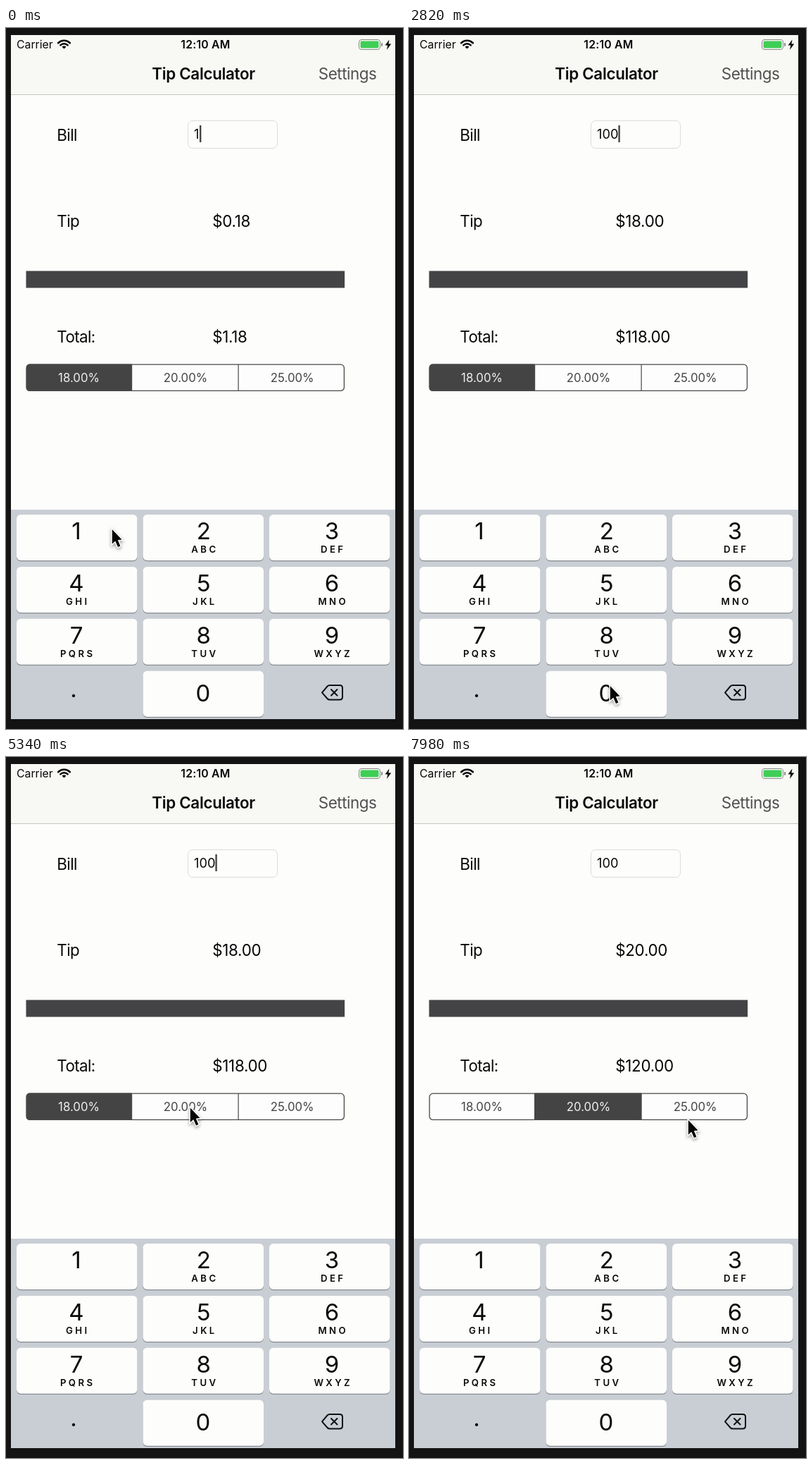
Animation, 564 px wide and 994 px high, one loop 8000 ms. Source, as an HTML page with a canvas:

```html
<!DOCTYPE html>
<html lang="en">
<head>
<meta charset="utf-8">
<title>Tip calculator</title>
<style>
  html, body { margin: 0; width: 100%; height: 100%; overflow: hidden; background: #131313; }
  canvas { display: block; width: 564px; height: 994px; }
</style>
</head>
<body>
<canvas id="stage" width="564" height="994"></canvas>
<script>
const ctx = document.getElementById('stage').getContext('2d');
const LOOP = 8000;
const FONT = 'Inter, "Open Sans", sans-serif';
const TINT = 68, PAPER = 253;
const WHITE = '#fdfdfb', INK = '#080808';

// Pointer stops: time, x, y
const PATH = [
  [0, 150, 709], [400, 150, 709], [1200, 285, 931], [3700, 285, 931],
  [4500, 257.5, 621], [5300, 261, 495.5], [6400, 261, 495.5],
  [6900, 288, 499], [7200, 288, 499], [7920, 396, 513], [8000, 396, 513]
];
const PRESSES = [[1440, 1660], [1850, 1980]];
const SEG_DOWN = 5920, SEG_UP = 6095, SEG_FADE = 250;

const KEYS = [
  ['1', ''], ['2', 'ABC'], ['3', 'DEF'],
  ['4', 'GHI'], ['5', 'JKL'], ['6', 'MNO'],
  ['7', 'PQRS'], ['8', 'TUV'], ['9', 'WXYZ']
];
const KEY_X = [15, 194.5, 374], LABEL_X = [100, 280.7, 463];
const ROW_Y = 690, ROW_STEP = 73.9;

const clamp = v => Math.max(0, Math.min(1, v));
const mix = (a, b, k) => a + (b - a) * k;
const gray = v => { v = Math.round(v); return `rgb(${v},${v},${v})`; };

function rect(x, y, w, h, color) {
  ctx.fillStyle = color;
  ctx.fillRect(x, y, w, h);
}

function round(x, y, w, h, r, fill, stroke, width = 1) {
  ctx.beginPath();
  ctx.roundRect(x, y, w, h, r);
  if (fill) { ctx.fillStyle = fill; ctx.fill(); }
  if (stroke) { ctx.strokeStyle = stroke; ctx.lineWidth = width; ctx.stroke(); }
}

function poly(points, fill) {
  ctx.beginPath();
  points.forEach(([x, y]) => ctx.lineTo(x, y));
  ctx.closePath();
  if (fill) { ctx.fillStyle = fill; ctx.fill(); }
}

function text(str, x, y, size, { weight = 400, align = 'left', color = INK, track = 0 } = {}) {
  ctx.font = `${weight} ${size}px ${FONT}`;
  ctx.letterSpacing = track + 'px';
  ctx.textAlign = align;
  ctx.fillStyle = color;
  ctx.fillText(str, align === 'center' ? x + track / 2 : x, y);
}

function pointerAt(t) {
  let i = 0;
  while (i < PATH.length - 2 && t >= PATH[i + 1][0]) i++;
  const [t0, x0, y0] = PATH[i], [t1, x1, y1] = PATH[i + 1];
  const k = clamp((t - t0) / (t1 - t0)), e = k * k * (3 - 2 * k);
  return [mix(x0, x1, e), mix(y0, y1, e)];
}

// Typing keeps the caret solid; otherwise it blinks with short fades.
function caretAlpha(t) {
  const period = 1050;
  if (t >= 1660 && t < 2260) return 1;
  const start = t < 1660 ? 1010 : 6980;
  const p = (((t - start + 40) % period) + period) % period - 40;
  return p < 300 ? clamp((p + 40) / 80) : clamp((660 - p) / 80);
}

function drawStatus() {
  text('Carrier', 15, 29.3, 15.8);
  text('12:10 AM', 283.3, 29.3, 15.8, { weight: 600, align: 'center', track: 0.2 });

  const cx = 82.5, cy = 29.6, a = -Math.PI * 0.75, b = -Math.PI * 0.25;
  ctx.beginPath();
  ctx.moveTo(cx, cy);
  ctx.arc(cx, cy, 4.2, a, b);
  ctx.fillStyle = INK;
  ctx.fill();
  ctx.strokeStyle = INK;
  ctx.lineWidth = 2.6;
  for (const r of [7.3, 11.8]) {
    ctx.beginPath();
    ctx.arc(cx, cy, r, a, b);
    ctx.stroke();
  }

  round(501.5, 16.5, 30, 14, 3.5, null, '#8a8a8a');
  round(503.5, 18.5, 26, 10, 2, '#3fce56');
  round(533, 21, 2, 5, 1, '#8a8a8a');
  poly([[544.5, 16.5], [538.5, 24.6], [542.2, 24.6], [541, 31], [547.2, 22.4], [543.4, 22.4]], INK);
}

function drawForm(t) {
  const bill = t < PRESSES[0][1] ? '1' : t < PRESSES[1][1] ? '10' : '100';
  const rate = t < SEG_UP ? 0.18 : 0.2;
  const label = (s, y) => text(s, 72.3, y, 22.4, { track: -0.6 });
  const money = (v, y) => text('$' + v.toFixed(2), 293.2, y, 22.4, { track: -0.3 });

  label('Bill', 159.7);
  round(258.5, 131.5, 127, 39, 6.5, WHITE, '#dcdce2');
  text(bill, 267, 157.2, 18.3);
  const alpha = caretAlpha(t);
  if (alpha > 0) {
    ctx.globalAlpha = alpha;
    rect(275 + 11.2 * (bill.length - 1), 138, 2.4, 24, '#464646');
    ctx.globalAlpha = 1;
  }

  label('Tip', 282);
  money(bill * rate, 282);
  rect(28.5, 344.5, 452.6, 24, '#444446');
  label('Total:', 445.7);
  money(bill * (1 + rate), 445.7);
}

function drawSegments(t) {
  const fade = clamp((t - SEG_UP) / SEG_FADE);
  const held = t >= SEG_DOWN ? 0.25 : 0;
  const fills = [1 - fade, mix(held, 1, fade), 0];
  const edges = [28.5, 178.5, 330, 481];

  ctx.save();
  ctx.beginPath();
  ctx.roundRect(28.5, 476.6, 452.5, 38.4, 5);
  ctx.clip();
  fills.forEach((k, i) =>
    rect(edges[i], 476, edges[i + 1] - edges[i], 40, gray(mix(PAPER, TINT, k))));
  ctx.restore();

  rect(178, 477, 1.2, 38, '#484848');
  rect(329.5, 477, 1.2, 38, '#484848');
  round(29.1, 477.2, 451.3, 37.2, 5, null, '#484848', 1.3);
  ['18.00%', '20.00%', '25.00%'].forEach((s, i) =>
    text(s, [103.5, 255, 406.7][i], 502, 16.8,
      { align: 'center', color: gray(mix(TINT, 240, fills[i])) }));
}

function drawKey(x, y, color) {
  round(x, y + 1.3, 171.5, 65, 6, '#878a90');
  round(x, y, 171.5, 65, 6, color);
}

function drawKeypad(t) {
  rect(7, 683, 546, 297, '#c9ced5');
  KEYS.forEach(([digit, letters], i) => {
    const c = i % 3, y = ROW_Y + Math.floor(i / 3) * ROW_STEP;
    drawKey(KEY_X[c], y, WHITE);
    text(digit, LABEL_X[c], y + 35, 33, { align: 'center' });
    text(letters, LABEL_X[c], y + 54.2, 13.2, { weight: 600, align: 'center', track: 3.4 });
  });

  const y = ROW_Y + 3 * ROW_STEP;
  const pressed = PRESSES.some(([down, up]) => t >= down && t < up);
  drawKey(KEY_X[1], y, pressed ? '#adbccf' : WHITE);
  text('0', 280, y + 42.8, 33, { align: 'center' });
  text('.', 96, 949, 33, { align: 'center' });

  ctx.strokeStyle = '#101010';
  ctx.lineWidth = 2;
  ctx.lineJoin = ctx.lineCap = 'round';
  ctx.beginPath();
  ctx.moveTo(449, 942.3);
  ctx.lineTo(456.5, 933.5);
  ctx.quadraticCurveTo(457.8, 932, 460, 932);
  ctx.lineTo(474, 932);
  ctx.quadraticCurveTo(478, 932, 478, 936);
  ctx.lineTo(478, 948.5);
  ctx.quadraticCurveTo(478, 952.5, 474, 952.5);
  ctx.lineTo(460, 952.5);
  ctx.quadraticCurveTo(457.8, 952.5, 456.5, 951);
  ctx.closePath();
  ctx.moveTo(462, 938);
  ctx.lineTo(470.5, 946.5);
  ctx.moveTo(470.5, 938);
  ctx.lineTo(462, 946.5);
  ctx.stroke();
}

function drawPointer(t) {
  const [x, y] = pointerAt(t);
  const arrow = [[0.8, 2], [0.8, 22.5], [5.3, 18.4], [9, 27], [12.4, 25.5], [8.8, 17], [14.6, 16.6]];
  ctx.save();
  ctx.translate(x, y);
  ctx.lineJoin = 'miter';
  ctx.shadowColor = 'rgba(0,0,0,.4)';
  ctx.shadowBlur = 4;
  ctx.shadowOffsetY = 2;
  poly(arrow);
  ctx.strokeStyle = WHITE;
  ctx.lineWidth = 3;
  ctx.stroke();
  ctx.shadowColor = 'transparent';
  poly(arrow, '#050505');
  ctx.restore();
}

function draw(t) {
  rect(0, 0, 564, 994, '#131313');
  rect(7, 10, 546, 970, WHITE);
  rect(7, 10, 546, 84, '#f8f8f5');
  rect(7, 94, 546, 1, '#c6c6c0');
  drawStatus();
  text('Tip Calculator', 280.7, 73.3, 22.4, { weight: 600, align: 'center', track: -0.33 });
  text('Settings', 443.8, 73.3, 22.4, { color: '#505050', track: -0.45 });
  drawForm(t);
  drawSegments(t);
  drawKeypad(t);
  drawPointer(t);
}

const begin = performance.now();
function tick() {
  draw((performance.now() - begin) % LOOP);
  requestAnimationFrame(tick);
}
tick();
</script>
</body>
</html>
```
